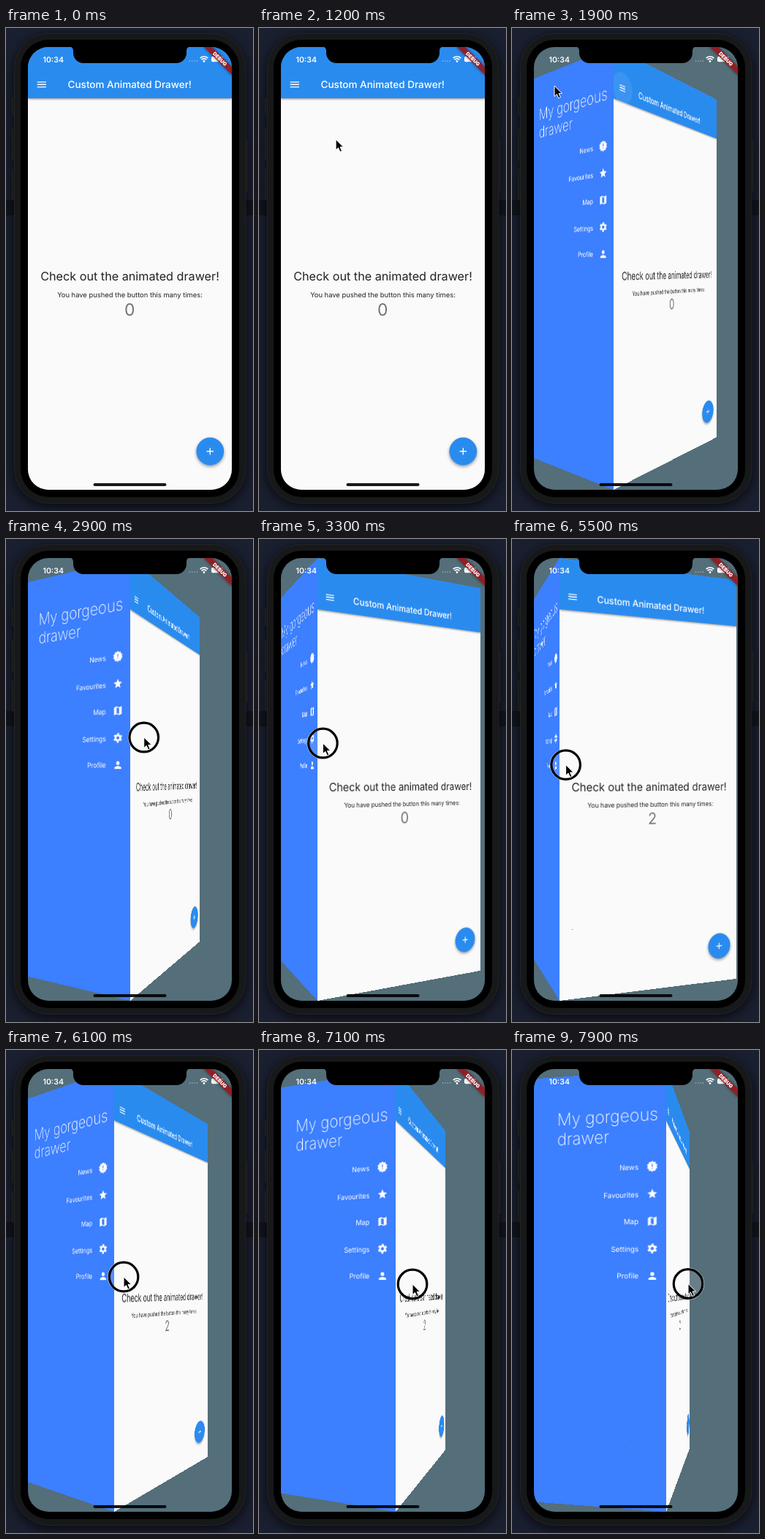
Animation of 338 by 660 pixels, one loop 8 s. Source, as an HTML page:

```html
<!DOCTYPE html>
<html lang="en">
<head>
<meta charset="utf-8">
<title>Animated drawer</title>
<style>
  html, body { margin: 0; width: 100%; height: 100%; overflow: hidden; background: #1b2031; }
  svg { position: absolute; left: 0; top: 0; display: block; overflow: hidden; }
  text { font-family: Inter, "Open Sans", sans-serif; text-rendering: geometricPrecision; }
  #screen { position: absolute; left: 30px; top: 26px; width: 279px; height: 605px;
            overflow: hidden; border-radius: 28px; background: #546e7a; }
  #page { transform-origin: left center; background: #fafafa; }
  #drawer { transform-origin: right center; background: #3c7fff; }
  #drawer text { fill: #fff; }
  .mid { text-anchor: middle; }
  .body { filter: drop-shadow(0 4px 9px #000b); }
  .bar { filter: drop-shadow(0 1.5px 1.5px #0007); }
  .fab { filter: drop-shadow(0 2px 2px #0006); }
  .banner { filter: drop-shadow(0 0 2px #0008); }
</style>
</head>
<body>
<svg width="338" height="660">
  <path d="M0 235H338V256H0Z" fill="#12151e"/>
  <g class="body" fill="#171819" stroke="#262728" stroke-width=".8">
    <rect x="8.5" y="96" width="5" height="22" rx="1"/>
    <rect x="8.5" y="138" width="5" height="43" rx="1"/>
    <rect x="8.5" y="193" width="5" height="42" rx="1"/>
    <rect x="325" y="153" width="5" height="70" rx="1"/>
    <rect x="11.5" y="7.500" width="316.500" height="642" rx="47"/>
  </g>
  <rect x="20" y="16" width="299" height="625" rx="38"/>
</svg>

<div id="screen">
  <svg id="drawer" width="202" height="605" viewBox="0 26 202 605">
    <g font-size="24" font-weight="200">
      <text x="45" y="94.500">My gorgeous</text>
      <text x="45" y="122.500">drawer</text>
    </g>
    <g id="items" font-size="10.2" text-anchor="end"></g>
  </svg>

  <svg id="page" width="279" height="605" viewBox="30 26 279 605">
    <path class="bar" d="M30 26H309V96H30Z" fill="#2a8bef"/>
    <circle id="menuRipple" cx="48.800" cy="77.200" r="22" fill="#fff"/>
    <path d="M42.700 73.800h12.200m-12.200 3.400h12.200m-12.200 3.400h12.200" stroke="#fff" stroke-width="1.350"/>
    <text class="mid" x="169.300" y="82" font-size="13.500" font-weight="500" fill="#fff">Custom Animated Drawer!</text>
    <text class="mid" x="169.500" y="344.500" font-size="16.200" fill="#222">Check out the animated drawer!</text>
    <text class="mid" x="169.500" y="368" font-size="9.400" fill="#222">You have pushed the button this many times:</text>
    <text class="mid" id="count" x="169.300" y="392.500" font-size="22.900" fill="#757575">0</text>
    <circle class="fab" cx="279.300" cy="578.500" r="18.900" fill="#2a8bef"/>
    <circle id="fabRipple" cx="279.300" cy="578.500" r="18.900" fill="#fff"/>
    <path d="M274.600 578.500h9.400m-4.700-4.700v9.400" stroke="#fff" stroke-width="1.350"/>
  </svg>

  <svg width="279" height="605" viewBox="30 26 279 605">
    <path d="M86 25Q92 26 92 31V34A14 14 0 0 0 106 48H233A14 14 0 0 0 247 34V31Q247 26 253 25Z"/>
    <text x="50.500" y="46.700" font-size="10.500" font-weight="600" fill="#fff">10:34</text>
    <path d="M251.500 45h12" stroke="#fff" stroke-opacity=".45" stroke-width="1.700" stroke-linecap="round" stroke-dasharray="0 3.300"/>
    <g fill="none" stroke="#fff" stroke-width="1.700">
      <path d="M265.700 41.200a7.500 7.500 0 0 1 10.600 0M267.600 43.300a4.800 4.800 0 0 1 6.800 0"/>
      <circle cx="271" cy="45.500" r=".6"/>
    </g>
    <rect x="281" y="38.700" width="16" height="7.600" rx="2" fill="#fff"/>
    <g transform="translate(309 26) rotate(45)">
      <path class="banner" d="M-27 18.900H27V27H-27Z" fill="#981d22" fill-opacity=".92"/>
      <text class="mid" y="25.400" font-size="6.900" font-weight="900" fill="#fff">DEBUG</text>
    </g>
    <rect x="119.500" y="622" width="100" height="4" rx="2" fill-opacity=".9"/>
  </svg>
</div>

<svg width="338" height="660">
  <g id="pointer">
    <g id="ring">
      <circle r="21.500" fill="#fff" fill-opacity=".12" stroke="#fff" stroke-opacity=".8"/>
      <circle r="19.800" fill="none" stroke="#000" stroke-width="3.200"/>
    </g>
    <path d="M0 0V14.500L3.400 11.400 5.900 17 8.400 15.900 6 10.400H10.500Z" stroke="#fff"/>
  </g>
</svg>

<script>
const LOOP = 8000, MAX_SLIDE = 202, DEPTH = 674;
const el = id => document.getElementById(id);

// Menu entries, icons drawn on a 24 unit grid
const teeth = (r, n, w) =>
  `<circle cx="12" cy="12" r="${r}" fill="none" stroke="#fff" stroke-width="${w}" pathLength="${2 * n}"
    stroke-dasharray="1" transform="rotate(${90 / n} 12 12)"/>`;
const menu = {
  News: '<circle cx="12" cy="12" r="9.500"/>' + teeth(10, 10, 1.8) +
    '<path d="M11 7h2v6h-2zM11 15h2v2h-2z" fill="#3c7fff"/>',
  Favourites: '<path d="M12 17.270 18.180 21 16.540 13.970 22 9.240 14.810 8.630 12 2 9.190 8.630 2 9.240 7.460 13.970 5.820 21Z"/>',
  Map: '<path fill-rule="evenodd" d="M3 5 9 3 15 5 21 3V19L15 21 9 19 3 21ZM9 5V16.900L15 19V7.100Z"/>',
  Settings: '<circle cx="12" cy="12" r="5.500" fill="none" stroke="#fff" stroke-width="4"/>' + teeth(8.4, 6, 3.2),
  Profile: '<circle cx="12" cy="8" r="4"/><path d="M4 20V18C4 15.340 9.330 14 12 14S20 15.340 20 18V20Z"/>'
};
el('items').innerHTML = Object.entries(menu).map(([label, icon], i) => {
  const y = 158.2 + 37.6 * i;
  return `<text x="163.300" y="${y + 3.7}">${label}</text>
    <g transform="translate(174.500 ${y - 8.1}) scale(.674)" fill="#fff">${icon}</g>`;
}).join('');

// Keys are [time, ...values], joined linearly
const openKeys = [[1766, 0], [2016, 1], [2600, 1], [2900, .692], [3300, .25], [3450, 0],
  [5250, 0], [6100, .584], [7100, .779], [7900, .895], [8000, .91]];
const pointerKeys = [[100, 268, 555], [500, 200, 300], [800, 200, 300], [1400, 58, 79], [2000, 58, 79],
  [2500, 267, 268], [2600, 267, 268], [2900, 189, 271], [3350, 75, 280], [3500, 75, 280],
  [3950, 286, 586], [4600, 286, 586], [5100, 37, 308], [5250, 37, 308],
  [6100, 161, 310], [7100, 210, 320], [7900, 241, 319.5], [8000, 245, 319.5]];

function sample(keys, t) {
  const i = keys.findIndex(k => k[0] > t);
  if (i < 1) return (i ? keys[keys.length - 1] : keys[0]).slice(1);
  const a = keys[i - 1], b = keys[i], p = (t - a[0]) / (b[0] - a[0]);
  return a.slice(1).map((v, j) => v + (b[j + 1] - v) * p);
}

const within = (t, from, to) => t >= from && t < to;
const pulse = (t, from, to) => within(t, from, to) ? Math.sin(Math.PI * (t - from) / (to - from)) : 0;
const show = (id, on) => el(id).style.visibility = on ? 'visible' : 'hidden';

function draw(now) {
  const t = now % LOOP;
  const [open] = sample(openKeys, t), [x, y] = sample(pointerKeys, t);
  const hinge = Math.round(MAX_SLIDE * open); // whole pixels keep the seam closed
  const place = (id, shift, angle) =>
    el(id).style.transform = `translateX(${shift}px) perspective(${DEPTH}px) rotateY(${angle}deg)`;

  place('page', hinge, 90 * open);
  place('drawer', hinge - MAX_SLIDE, -90 * (1 - open));
  show('page', open < 1);
  show('drawer', open > 0);

  el('count').textContent = t < 4050 ? 0 : t < 4500 ? 1 : 2;
  el('menuRipple').style.opacity = .08 * pulse(t, 1600, 2100);
  el('fabRipple').style.opacity = .08 * (pulse(t, 4000, 4400) + pulse(t, 4450, 4850));

  el('pointer').setAttribute('transform', `translate(${x} ${y})`);
  el('pointer').style.display = t < 100 ? 'none' : '';
  el('ring').style.display = within(t, 2550, 3400) || t >= 5150 ? '' : 'none';
  requestAnimationFrame(draw);
}
requestAnimationFrame(draw);
</script>
</body>
</html>
```
